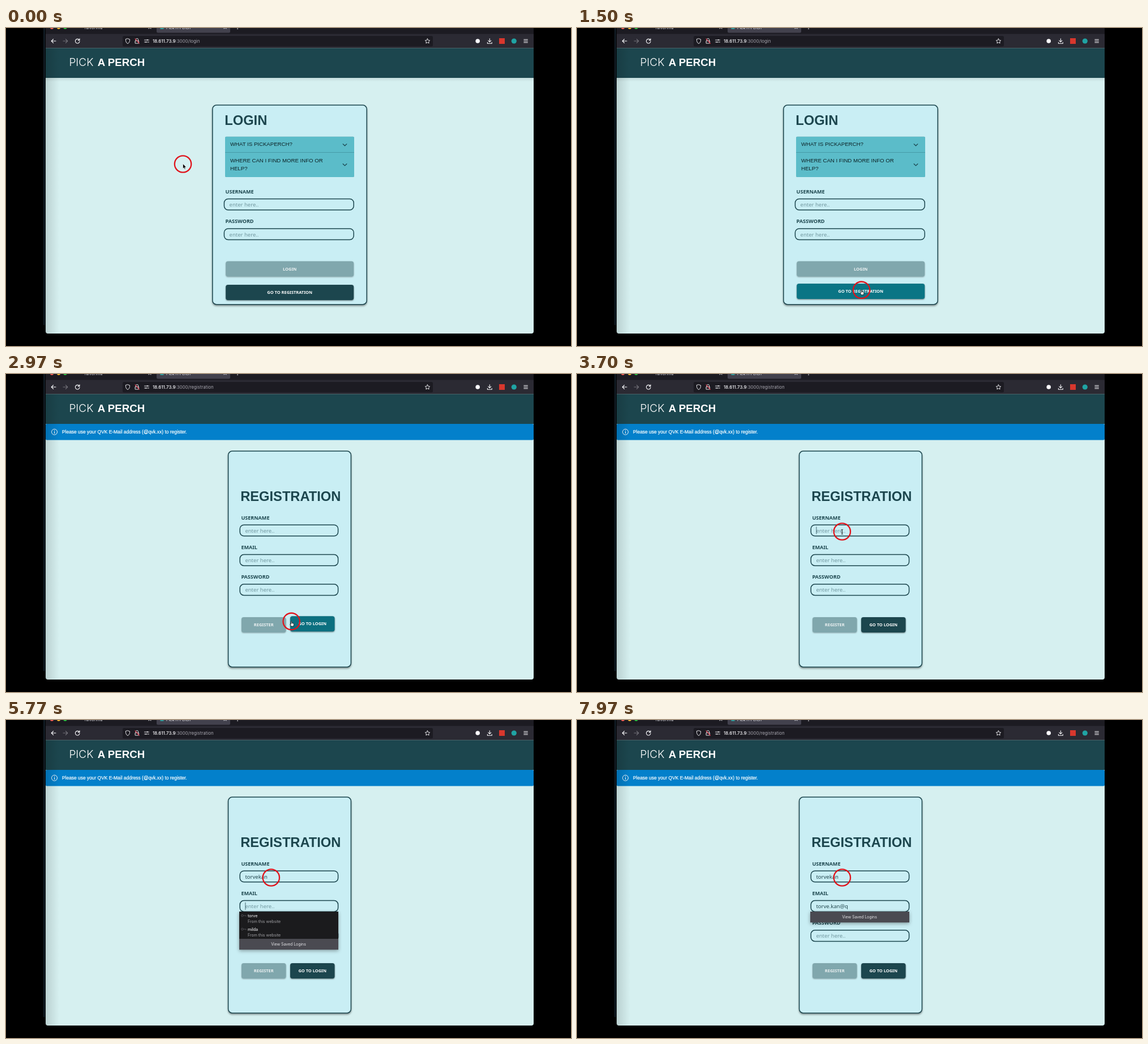
Recreate the animation shown at these times as an HTML page. Size 998 by 561 pixels, loop 8000 ms.

```html
<!DOCTYPE html>
<html lang="en">
<head>
<meta charset="utf-8">
<title>Registration</title>
<style>
  html, body { margin: 0; width: 100%; height: 100%; overflow: hidden; background: #000; }
  svg { display: block; width: 100%; height: 100%; }
  text { white-space: pre; }
  .ui { font-family: Inter, Roboto, sans-serif; }
  .arial { font-family: "Liberation Sans", Arial, sans-serif; }
  .form { font-family: "Noto Sans", "Open Sans", sans-serif; }
  .title { font-size: 23.7px; font-weight: 700; fill: #1c464e; }
  .question { font-size: 9.65px; fill: #0d2226; }
  .label { font-size: 9.05px; font-weight: 700; fill: #1c464e; }
  .value { font-size: 9.5px; fill: #23484f; }
  .hint { fill: #7198a0; }
  .caption { font-size: 7.45px; font-weight: 700; text-anchor: middle; fill: #fff; }
  .card { fill: #c9eef4; stroke: #1c464e; stroke-width: 1.5; filter: drop-shadow(0 2px 1.5px rgba(0,0,0,.4)); }
  .field { fill: none; stroke: #1c464e; stroke-width: 1.5; }
  .button { filter: drop-shadow(.6px 1px .8px rgba(0,0,0,.5)); }
  .off { filter: drop-shadow(.6px 1px .8px rgba(0,0,0,.3)); }
  .line { fill: none; stroke: #fbfbfe; stroke-width: 1.1; stroke-linecap: round; stroke-linejoin: round; }
  .popup { filter: drop-shadow(0 2px 3px rgba(0,0,0,.35)); }
</style>
</head>
<body>
<svg id="stage" viewBox="0 0 998 561" preserveAspectRatio="none"></svg>
<script>
const LOOP = 8000, PAGE_CHANGE = 1840, FIRST_KEY = 4440;
const DARK = '#1c464e', DISABLED = '#80a7ad';

const rect = (x, y, w, h, fill, extra = '') =>
  `<rect x="${x}" y="${y}" width="${w}" height="${h}" fill="${fill}" ${extra}/>`;
const text = (x, y, cls, str, extra = '') =>
  `<text x="${x}" y="${y}" class="${cls}" ${extra}>${str}</text>`;
const line = (d, extra = '') => `<path class="line" d="${d}" ${extra}/>`;
const dot = (x, y, r, fill) => `<circle cx="${x}" cy="${y}" r="${r}" fill="${fill}"/>`;

const card = (x, y, w, h) => `<rect class="card" x="${x}" y="${y}" width="${w}" height="${h}" rx="7"/>`;

const field = (f) =>
  text(f.x + 2.2, f.y - 9.7, 'form label', f.label) +
  `<rect class="field" x="${f.x}" y="${f.y}" width="${f.w}" height="19.6" rx="7"/>` +
  text(f.x + 9.2, f.y + 13.6, 'form value hint', 'enter here..', `id="${f.id}"`);

const button = (x, y, w, label, on, id = '') =>
  `<g id="${id}">` +
  rect(x, y, w, 27, on ? DARK : DISABLED, `rx="4" class="${on ? 'button' : 'off'}"`) +
  text(x + w / 2, y + 16.1, 'form caption', label, on ? '' : 'fill-opacity=".85"') + '</g>';

const loginFields = [
  { id: 'loginName', label: 'USERNAME', x: 385.4, y: 301.4, w: 228.8 },
  { id: 'loginPass', label: 'PASSWORD', x: 385.4, y: 353.9, w: 228.8 }
];
const regFields = [
  { id: 'regName', label: 'USERNAME', x: 413.2, y: 266.2, w: 173.4 },
  { id: 'regMail', label: 'EMAIL', x: 413.2, y: 318.6, w: 173.4 },
  { id: 'regPass', label: 'PASSWORD', x: 413.2, y: 370.8, w: 173.4 }
];
const toRegister = { x: 388.2, y: 453, w: 226, h: 27 };
const toLogin = { x: 502, y: 429, w: 78.5, h: 27 };

const browser = () =>
  rect(66, 0, 3, 524, '#101a22') +
  rect(70, 0, 862, 35.5, '#2b2a33') + rect(70, 0, 862, 10.5, '#1c1b22') +
  rect(266, -8, 130, 16.5, '#42414d', 'rx="2.5"') +
  dot(81, -1.4, 3.3, '#ff5f57') + dot(93, -1.4, 3.3, '#febc2e') + dot(104.5, -1.4, 3.3, '#28c840') +
  text(137.5, 1.6, 'ui', 'Talvorima', 'font-size="7.2" fill="#d5d5dc"') +
  rect(272.5, -4, 6, 6, '#2f9c9c') +
  text(283, 1.6, 'ui', 'Pick A Perch', 'font-size="7.2" fill="#fbfbfe"') +
  line('M252-3l4 4M256-3l-4 4M385-3l4 4M389-3l-4 4M409-4V2', 'stroke-width=".8" opacity=".8"') +
  line('M88 23H80.2M83.6 19.6L80.2 23L83.6 26.4') +
  line('M101 23H108.8M105.4 19.6L108.8 23L105.4 26.4', 'opacity=".35"') +
  line('M129 20.6A3.8 3.8 0 1 0 130 23.6M130 18.9V21.6H127.2') +
  rect(206, 14, 548, 18.5, '#1c1b22', 'rx="2.5"') +
  line('M215 18.8L218.6 20C218.6 24 217.8 26 215 27.6C212.2 26 211.4 24 211.4 20Z', 'style="stroke-width:.9"') +
  line('M229.3 22.5V20.8A2.2 2.2 0 0 1 233.7 20.8V22.5M228.5 22.7H234.5V27H228.5Z', 'style="stroke-width:.9"') +
  line('M228 19L235.4 27.2', 'style="stroke:#ff3b52"') +
  line('M244.5 21.2H248M251 21.2H252.5M244.5 24.8H246M249.5 24.8H252.5', 'style="stroke-width:.9"') +
  dot(249.6, 21.2, 1.1, '#fbfbfe') + dot(247.4, 24.8, 1.1, '#fbfbfe') +
  text(259, 26, 'ui', '<tspan fill="#fbfbfe" font-weight="500">18.611.73.9</tspan><tspan fill="#a5a4ad" id="path"></tspan>', 'font-size="7.9"') +
  line('M744.5 18.9L745.8 21.6L748.7 22L746.6 24L747.1 26.9L744.5 25.5L741.9 26.9L742.4 24L740.3 22L743.2 21.6Z', 'style="stroke-width:.9"') +
  dot(833.2, 23, 3.8, '#fbfbfe') +
  line('M854.3 18.8V24.4M851.8 22.2L854.3 24.6L856.8 22.2M850.4 25.2V27.2H858.2V25.2') +
  rect(871, 18, 10, 10, '#d8372d') + dot(897.3, 23, 4.6, '#20a3a3') +
  line('M914.8 20.3H921.4M914.8 23H921.4M914.8 25.7H921.4', 'style="stroke-width:1"');

const site = () =>
  `<path d="M70 35.5H932V535a4 4 0 0 1-4 4H74a4 4 0 0 1-4-4Z" fill="#d6f0f0"/>` +
  rect(70, 88, 862, 7, 'url(#under)') +
  rect(70, 35.5, 862, 52.5, DARK) +
  text(111.4, 67.2, 'ui', 'PICK', 'font-size="19" font-weight="300" fill="#fff"') +
  text(161.8, 67.2, 'arial', 'A PERCH', 'font-size="18.7" font-weight="700" fill="#fff"');

const loginPage = () =>
  card(364.8, 136.1, 272.4, 351.6) +
  text(386.3, 170.8, 'arial title', 'LOGIN') +
  rect(387, 191.7, 228, 71.3, '#5bbcc9', 'rx="2" style="filter:drop-shadow(0 .7px .6px rgba(0,0,0,.35))"') +
  rect(387, 219, 228, .9, '#4598a5') +
  text(396, 208.4, 'arial question', 'WHAT IS PICKAPERCH?') +
  text(396, 236.8, 'arial question', 'WHERE CAN I FIND MORE INFO OR') +
  text(396, 250.7, 'arial question', 'HELP?') +
  line('M595.2 204.6L598.5 207.8L601.8 204.6M595.2 239.7L598.5 242.9L601.8 239.7', `style="stroke:${DARK};stroke-width:1.3"`) +
  loginFields.map(field).join('') +
  button(388.2, 411.6, 226, 'LOGIN', false) +
  button(toRegister.x, toRegister.y, toRegister.w, 'GO TO REGISTRATION', true, 'toRegister');

const popup = () =>
  '<g id="popup" class="popup">' +
  '<g id="entries">' + ['torve', 'milda'].map((name, i) => {
    const y = 338 + i * 24;
    return `<g>${rect(412, y, 175, 24.2, '#1b1b1d')}` +
      `<circle cx="417.4" cy="${y + 7}" r="1.8" fill="none" stroke="#59595e" stroke-width=".8"/>` +
      `<path d="M419.2 ${y + 7}H424V${y + 8.6}" fill="none" stroke="#59595e" stroke-width=".8"/>` +
      text(427, y + 9.6, 'ui', name, 'font-size="7" font-weight="500" fill="#e4e4e6"') +
      text(427, y + 19.6, 'ui', 'From this website', 'font-size="7" fill="#a0a0a4"') + '</g>';
  }).join('') + '</g><g id="footer">' + rect(412, 338, 175, 19.2, '#4a4a51') +
  text(499, 350.3, 'ui', 'View Saved Logins', 'font-size="6.9" fill="#e6e6e9" text-anchor="middle"') + '</g></g>';

const regPage = () =>
  rect(70, 88, 862, 28.4, '#0380cb', 'rx="2"') +
  '<circle cx="85.5" cy="102.2" r="5" fill="none" stroke="#fff" stroke-width="1"/>' +
  rect(85, 101.4, 1.1, 3.6, '#fff') + rect(85, 99.3, 1.1, 1.2, '#fff') +
  text(99, 104.9, 'arial', 'Please use your QVK E-Mail address (@qvk.xx) to register.',
    'font-size="8.42" fill="#fff" stroke="#fff" stroke-width=".2"') +
  card(392.6, 136.1, 216.8, 380.8) +
  text(414.2, 224, 'arial title', 'REGISTRATION') +
  regFields.map(field).join('') +
  button(416, 429, 78.5, 'REGISTER', false) +
  button(toLogin.x, toLogin.y, toLogin.w, 'GO TO LOGIN', true, 'toLogin') +
  rect(0, 0, .8, 13, '#23484f', 'id="caret"') + popup();

const cursor = () =>
  '<g id="cursor">' +
  '<path id="arrow" d="M0-.5V8L1.9 6.4L3.2 9.3L4.6 8.7L3.3 5.9L5.9 5.7Z" fill="#000" stroke="#fff" stroke-width=".6"/>' +
  '<path id="hand" d="M-.7 .2Q0-.9 .8 .2V3L3.6 3.7Q4.5 4 4.3 5L3.7 8.6H-.3L-2.4 5.2Q-2.2 4.1-.7 5.2Z" fill="#fff" stroke="#111" stroke-width=".8"/>' +
  '<path id="beam" d="M-1.6-3.8Q0-3.8 0-2.8Q0-3.8 1.6-3.8M0-3V4M-1.6 4.8Q0 4.8 0 3.8Q0 4.8 1.6 4.8M-1 1.6H1" fill="none" stroke="#222" stroke-width=".9"/>' +
  '<circle r="14.7" fill="none" stroke="#e0131b" stroke-width="2.3"/></g>';

document.getElementById('stage').innerHTML =
  '<defs><linearGradient id="side"><stop stop-opacity=".13"/><stop offset="1" stop-opacity="0"/></linearGradient>' +
  '<linearGradient id="under" x2="0" y2="1"><stop stop-opacity=".08"/><stop offset="1" stop-opacity="0"/></linearGradient></defs>' +
  rect(0, 0, 998, 561, '#000') + browser() + site() +
  `<g id="login">${loginPage()}</g><g id="register">${regPage()}</g>` +
  rect(70, 35.5, 24, 503, 'url(#side)') + cursor();

const el = {};
document.querySelectorAll('[id]').forEach(node => { if (node.id) el[node.id] = node; });

const clamp = v => Math.min(1, Math.max(0, v));
const ramp = (t, a, b) => { const u = clamp((t - a) / (b - a)); return u * u * (3 - 2 * u); };
const show = (node, on) => node.setAttribute('visibility', on ? 'inherit' : 'hidden');
const inside = (p, r) => p.x >= r.x && p.x <= r.x + r.w && p.y >= r.y && p.y <= r.y + (r.h || 20);

// Pointer path: two eased quadratic curves
const spots = [[312.5, 240], [502.5, 462.2], [468.3, 278]];
const bend = (u, a, c, b) => (1 - u) ** 2 * a + 2 * u * (1 - u) * c + u * u * b;
function pointer(t) {
  const second = t >= 2000;
  const [a, b] = second ? [spots[1], spots[2]] : [spots[0], spots[1]];
  const c = second ? [512, 385] : [400, 352];
  const u = second ? ramp(t, 2790, 3500) : ramp(t, 460, 1100);
  return { x: bend(u, a[0], c[0], b[0]), y: bend(u, a[1], c[1], b[1]) };
}

const nameKeys = { word: 'torvekan', times: [4440, 4500, 4570, 4640, 4770, 4970, 5100, 5170] };
const mailKeys = { word: 'torve.kan@q', times: [6170, 6230, 6300, 6440, 6500, 6640, 6900, 7030, 7100, 7370, 7500] };

function type(node, keys, t) {
  const typed = keys.word.slice(0, keys.times.filter(k => k <= t).length);
  node.textContent = typed || 'enter here..';
  node.classList.toggle('hint', !typed);
  return typed ? node.getComputedTextLength() : 0;
}

function hover(node, amount) {
  const mix = (a, b) => Math.round(a + (b - a) * amount);
  node.setAttribute('transform', `translate(0 ${-2 * amount})`);
  node.firstChild.setAttribute('fill', `rgb(${mix(28, 10)},${mix(70, 117)},${mix(78, 133)})`);
}

function draw(t) {
  const registering = t >= PAGE_CHANGE;
  show(el.login, !registering);
  show(el.register, registering);
  el.path.textContent = registering ? ':3000/registration' : ':3000/login';

  hover(el.toRegister, ramp(t, 1000, 1250));
  hover(el.toLogin, ramp(t, 2850, 3000) - ramp(t, 3000, 3200));

  const nameWidth = type(el.regName, nameKeys, t);
  const mailWidth = type(el.regMail, mailKeys, t);
  const onMail = t >= 5700;
  const blink = (t >= 3700 && t < 4200) || (t >= FIRST_KEY && t < 5440) || (onMail && t < 7900);
  show(el.caret, registering && blink);
  const box = regFields[onMail ? 1 : 0];
  el.caret.setAttribute('x', box.x + 9.3 + (onMail ? mailWidth : nameWidth));
  el.caret.setAttribute('y', box.y + 3.2);

  const rows = t < 6170 ? 2 : t < 6700 ? 1 : 0;
  show(el.popup, registering && onMail);
  [...el.entries.children].forEach((row, i) => show(row, registering && onMail && i < rows));
  el.footer.setAttribute('transform', `translate(0 ${rows * 24})`);

  const p = pointer(t);
  const onButton = inside(p, registering ? toLogin : toRegister);
  const onField = (registering ? regFields : loginFields).some(f => inside(p, f));
  const visible = t < FIRST_KEY;
  el.cursor.setAttribute('transform', `translate(${p.x} ${p.y})`);
  show(el.hand, visible && onButton);
  show(el.beam, visible && onField);
  show(el.arrow, visible && !onButton && !onField);
}

const start = performance.now();
function tick() {
  draw((performance.now() - start) % LOOP);
  requestAnimationFrame(tick);
}
tick();
</script>
</body>
</html>
```
